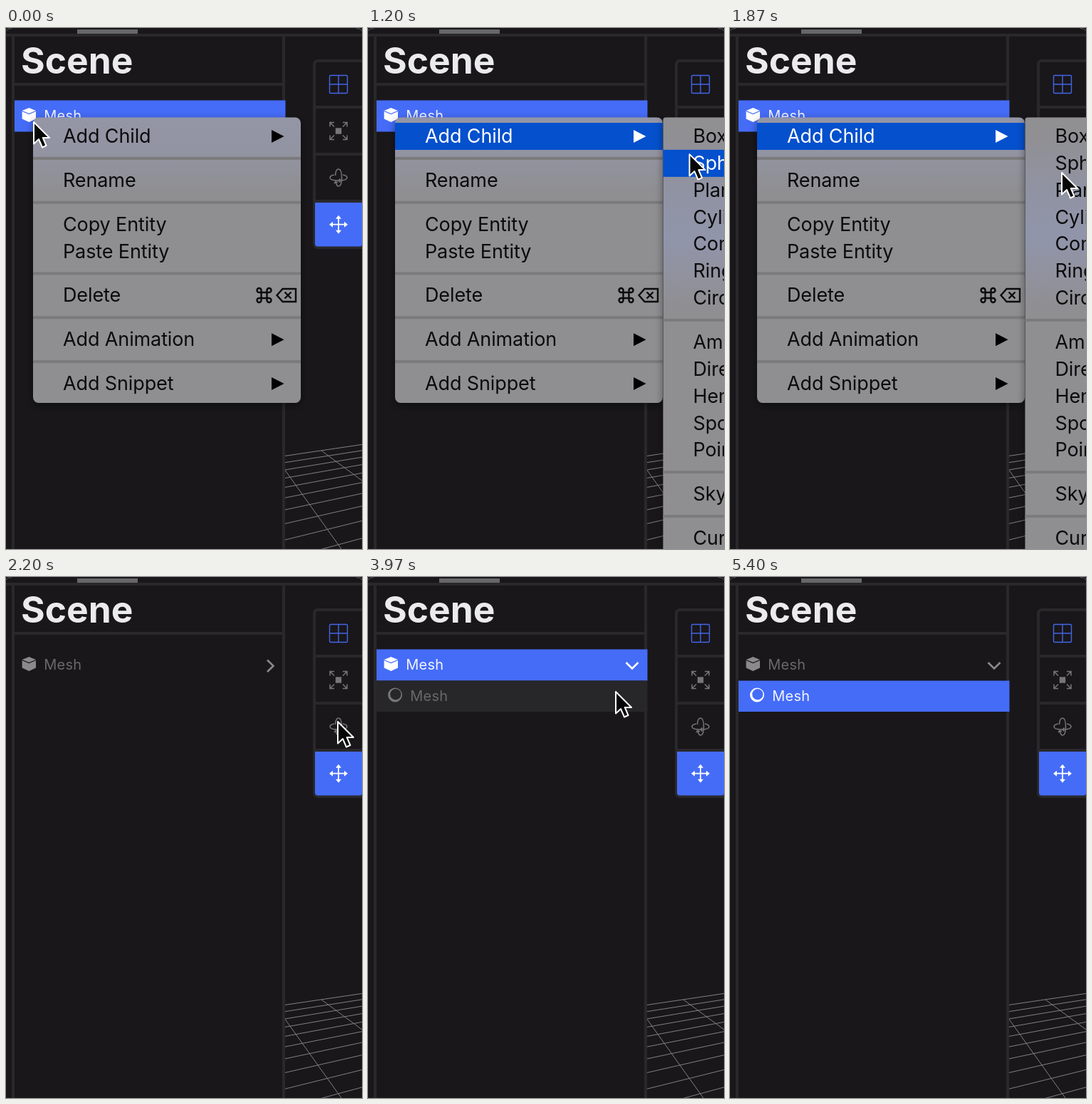
Animation, 500 px wide and 731 px high, one loop 5.43 s. Source, as an HTML page:

```html
<!DOCTYPE html>
<html lang="en">
<head>
<meta charset="utf-8">
<title>Scene panel</title>
<style>
html, body { margin: 0; width: 100%; height: 100%; overflow: hidden; background: #19171a; }
svg { display: block; width: 500px; height: 731px; font-family: Inter, Roboto, sans-serif; }
.item { font-size: 27px; letter-spacing: -.12px; fill: #0b0b0c; }
.label { font-size: 20px; letter-spacing: .25px; }
.on .bar { fill: #0450cd; }
.on text, .on .arrow { fill: #fff; }
.bar { fill: none; }
.line { fill: none; stroke: currentColor; }
</style>
</head>
<body>
<svg viewBox="0 0 500 731">
  <defs>
    <linearGradient id="mainFill" gradientUnits="userSpaceOnUse" x1="0" x2="0" y1="125" y2="235">
      <stop offset="0" stop-color="#9496a6"/><stop offset=".4" stop-color="#9294a3"/><stop offset="1" stop-color="#8f8e90"/>
    </linearGradient>
    <linearGradient id="subFill" gradientUnits="userSpaceOnUse" x1="0" x2="0" y1="140" y2="400">
      <stop offset="0" stop-color="#908f91"/><stop offset=".35" stop-color="#9093a3"/>
      <stop offset=".6" stop-color="#9195aa"/><stop offset="1" stop-color="#8f8e90"/>
    </linearGradient>
    <filter id="shade" x="-20%" y="-20%" width="140%" height="140%">
      <feDropShadow dx="0" dy="4" stdDeviation="6" flood-opacity=".45"/>
    </filter>
  </defs>

  <rect width="500" height="731" fill="#19171a"/>
  <path class="line" color="#555457" d="M0 4Q2 .5 8 .5M492 .5Q498 .5 500 4"/>
  <rect x="100" y="2" width="85" height="6" fill="#676669"/>
  <path id="grid" class="line" color="#807f82"/>
  <path fill="#29282b" d="M0 8H500V12H0zM8 10H12V731H8zM388 10H392V731H388zM10 77H390V81H10z"/>
  <text x="21" y="64" font-size="51.5" font-weight="700" fill="#ebeaed">Scene</text>

  <!-- toolbar -->
  <rect x="433" y="46" width="80" height="262" rx="5" fill="#19171a" stroke="#29282b" stroke-width="4"/>
  <path fill="#29282b" d="M433 109H500V113H433zM433 175H500V179H433zM433 241H500V245H433z"/>
  <path fill="#456cf7" d="M434 245H500V303.500Q500 306.500 497 306.500H438Q434 306.500 434 302.500z"/>
  <g class="line" color="#4366e8" stroke-width="1.4">
    <rect x="454.500" y="66.500" width="25" height="25" rx="1.5"/><path d="M467 67V91M455 79H479"/>
  </g>
  <g color="#777679" transform="translate(467 144.500)">
    <rect x="-4.2" y="-4.2" width="8.4" height="8.4" fill="currentColor"/>
    <path id="corners" class="line" stroke-width="1.5"/>
  </g>
  <g class="line" color="#777679" stroke-width="1.5" transform="translate(467 210)">
    <path d="M-4.500 -3Q-4 -12 0 -12Q4.500 -12 4.500 0Q4.500 12 0 12Q-2.500 12 -4 6M-6 8L-4 5.500L-1 7"/>
    <path d="M-6 -4Q-12 -3 -12 0Q-12 4 0 4Q12 4 12 0Q12 -3 6 -4M2.500 1.500L0 4L2.500 6.500"/>
  </g>
  <g id="move" fill="#fff" transform="translate(467 275.700)">
    <path class="line" color="#fff" stroke-width="1.8" d="M-10 0H10M0 -10V10"/>
  </g>

  <!-- tree -->
  <g id="parent">
    <rect class="row" x="12" y="101.500" width="380.500" height="44"/>
    <path fill="currentColor" d="M32.300 112L42 116V127.500L32.300 132L22.600 127.500V116z"/>
    <path class="seam" fill="none" stroke-width="1.2" d="M22.600 116.500L32.300 120.500L42 116.500"/>
    <text class="label" x="53.300" y="129.500">Mesh</text>
    <path id="chevron" class="line" stroke-width="2.600"/>
  </g>
  <g id="child">
    <rect class="row" x="12" y="145.500" width="380.500" height="43.500"/>
    <path fill="currentColor" fill-rule="evenodd" d="M28 165.500a10 10 0 1 0 20 0a10 10 0 1 0 -20 0M31.200 164.700a7.600 7.600 0 1 0 15.200 0a7.600 7.600 0 1 0 -15.200 0"/>
    <text class="label" x="59.300" y="173.500">Mesh</text>
  </g>

  <g id="menus">
    <g id="main">
      <rect x="38" y="125.500" width="376" height="400.500" rx="8" fill="url(#mainFill)" filter="url(#shade)"/>
    </g>
    <g id="sub">
      <path fill="url(#subFill)" filter="url(#shade)" d="M418 125.500H520V760H414.500V129Q414.500 125.500 418 125.500z"/>
    </g>
    <g class="line" color="#0b0b0c" stroke-width="2.400" transform="translate(362.500 375)">
      <path d="M-4 -4H4V4H-4zM-4 -4H-7A3 3 0 1 1 -4 -7zM4 -4V-7A3 3 0 1 1 7 -4zM4 4H7A3 3 0 1 1 4 7zM-4 4V7A3 3 0 1 1 -7 4z"/>
      <path d="M18 0L26 -9H44.500V9H26zM29 -4.500L38 4.500M38 -4.500L29 4.500"/>
    </g>
  </g>
  <path id="cursor" d="M0 0V30.500L7 24L12 35.500L17.500 33L12.800 22H22z" fill="#060606" stroke="#fff" stroke-width="2" stroke-linejoin="round"/>
</svg>

<script>
const LOOP = 5430;
const $ = id => document.getElementById(id);

function add(parent, tag, attrs, text = '') {
  const el = document.createElementNS('http://www.w3.org/2000/svg', tag);
  for (const key in attrs) el.setAttribute(key, attrs[key]);
  el.textContent = text;
  return parent.appendChild(el);
}

// Items sit one row apart; '-' is a separator, '>' marks a nested menu.
function buildMenu(parent, x, width, items) {
  let y = 152;
  return items.map(name => {
    if (name === '-') {
      add(parent, 'rect', { x, y: y - 9, width, height: 4, fill: '#7b7a7c' });
      y += 24;
      return null;
    }
    const row = add(parent, 'g', {});
    add(row, 'rect', { class: 'bar', x, y: y - 19, width, height: 38 });
    add(row, 'text', { class: 'item', x: x + 42, y: y + 9 }, name.replace('>', ''));
    if (name.endsWith('>')) add(row, 'path', { class: 'arrow', d: `M373 ${y - 9}L390.500 ${y}L373 ${y + 9}z` });
    y += 37.85;
    return row;
  });
}

const [addChild] = buildMenu($('main'), 38, 376, ['Add Child>', '-', 'Rename', '-', 'Copy Entity',
  'Paste Entity', '-', 'Delete', '-', 'Add Animation>', '-', 'Add Snippet>']);
const [box, sphere] = buildMenu($('sub'), 414.5, 100, ['Box', 'Sphere', 'Plane', 'Cylinder', 'Cone', 'Ring',
  'Circle', '-', 'Ambient', 'Directional', 'Hemisphere', 'Spot', 'Point', '-', 'Sky', '-', 'Curved']);

// Floor grid: rows converge on a far vanishing point.
let floor = 'M443 593L500 635M392 620.5L471 731';
for (let i = 0; i < 10; i++) {
  const depth = 1 / (0.005747 - 0.00029 * i);
  floor += `M392 ${426.4 + depth}L500 ${426.4 + depth * (1 - 108 * 0.00085)}`;
}
$('grid').setAttribute('d', floor);

let corners = '';
for (const a of [-1, 1]) for (const b of [-1, 1])
  corners += `M${6 * a} ${6 * b}L${12 * a} ${12 * b}M${6 * a} ${12 * b}H${12 * a}V${6 * b}`;
$('corners').setAttribute('d', corners);
for (let a = 0; a < 360; a += 90)
  add($('move'), 'path', { d: 'M13 0L8 -4V4z', transform: `rotate(${a})` });

// Cursor stops: time, x, y
const path = [
  [0, 39, 132], [60, 39, 132], [180, 85, 148], [680, 427, 144], [820, 427, 144], [1050, 442, 160],
  [1400, 466, 203], [2300, 466, 203], [2560, 405, 98], [2800, 375, 126], [3440, 375, 126],
  [3860, 348, 161], [4570, 348, 161], [4980, 512, 230], [LOOP, 512, 230]
];

function cursorAt(t) {
  const i = path.findIndex(p => p[0] > t);
  const [t0, x0, y0] = path[i - 1], [t1, x1, y1] = path[i];
  const u = (t - t0) / (t1 - t0), e = u * u * (3 - 2 * u);
  return [x0 + (x1 - x0) * e, y0 + (y1 - y0) * e];
}

function paintRow(id, selected, rest, icon) {
  const row = $(id), fill = selected ? '#456cf7' : rest;
  row.setAttribute('color', selected ? '#fff' : icon);
  row.querySelector('.row').setAttribute('fill', fill);
  row.querySelector('text').setAttribute('fill', selected ? '#f2f4ff' : '#69686b');
  row.querySelector('.seam')?.setAttribute('stroke', selected ? fill : '#19171a');
}

const show = (el, on) => el.setAttribute('visibility', on ? 'visible' : 'hidden');

function draw(t) {
  const [x, y] = cursorAt(t);
  $('cursor').setAttribute('transform', `translate(${x} ${y})`);

  $('menus').setAttribute('opacity', Math.max(0, Math.min(1, (2120 - t) / 170)));
  show($('sub'), t >= 330);
  addChild.classList.toggle('on', t >= 120);
  box.classList.toggle('on', t >= 880 && y < 171);
  sphere.classList.toggle('on', t >= 880 && y >= 171 && !(t >= 1840 && t < 1900));

  const nested = t >= 2100, open = t >= 3360, childPicked = t >= 4200;
  paintRow('parent', !nested || (open && !childPicked), 'none', '#8a898b');
  paintRow('child', childPicked, '#272629', '#777679');
  show($('child'), open);
  show($('chevron'), nested);
  $('chevron').setAttribute('d', open ? 'M362.500 120L371 128.500L379.500 120' : 'M367 116.500L375.500 124.700L367 133');
}

const start = performance.now();
function tick() {
  draw((performance.now() - start) % LOOP);
  requestAnimationFrame(tick);
}
tick();
</script>
</body>
</html>
```
